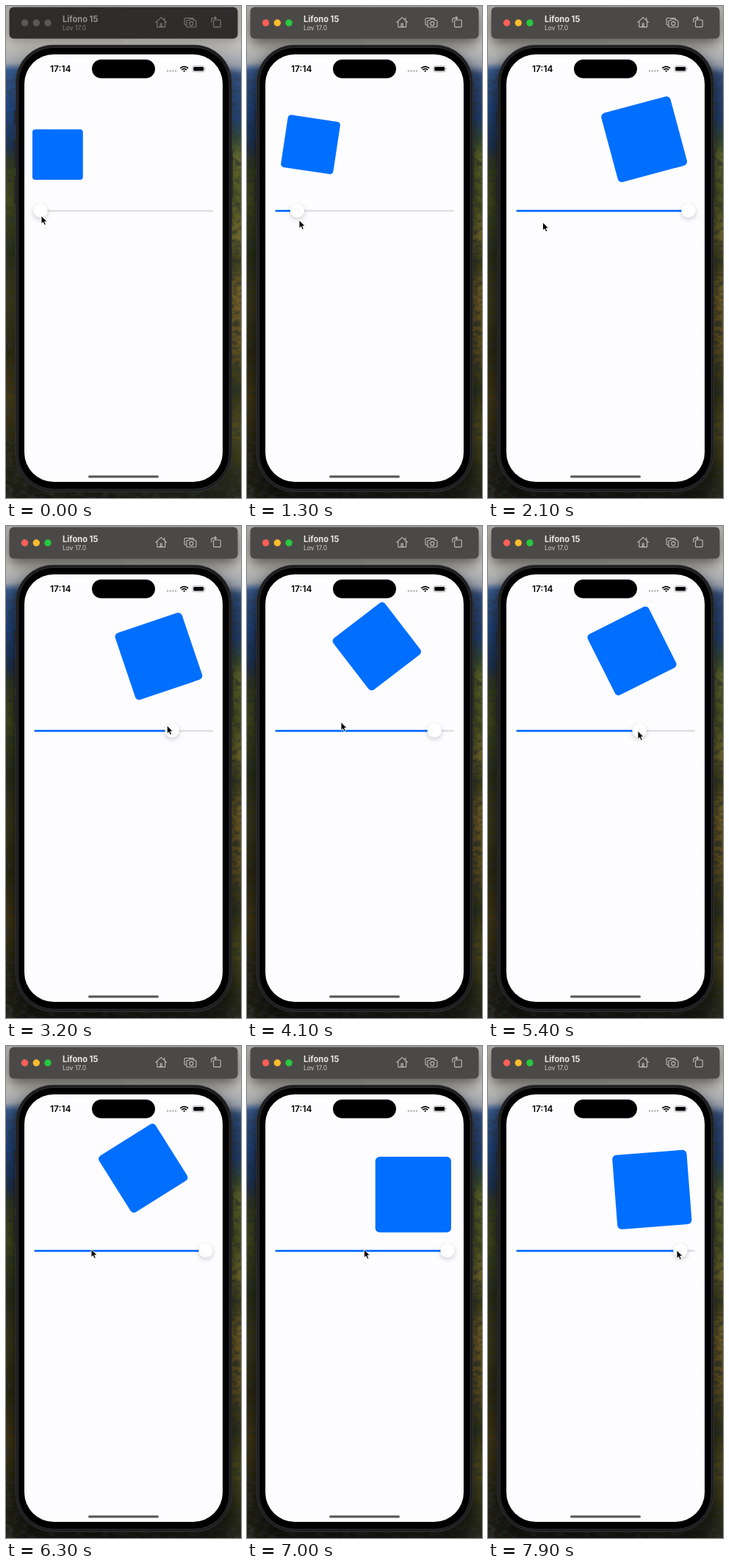
These frames come from a looping animation (320x671 px, 8000 ms). An HTML page:

```html
<!DOCTYPE html>
<html lang="en">
<head>
<meta charset="utf-8">
<title>Slider animation</title>
<style>
html, body { margin: 0; width: 100%; height: 100%; overflow: hidden; background: #222; }
svg { display: block; width: 320px; height: 671px; }
text { font-family: Inter, sans-serif; }
</style>
</head>
<body>
<svg viewBox="0 0 320 671">
  <defs>
    <linearGradient id="left" x1="0" y1="0" x2="0" y2="1">
      <stop offset="0" stop-color="#aaa8a4"/>
      <stop offset=".08" stop-color="#c6c3bb"/>
      <stop offset=".115" stop-color="#a3a7ad"/>
      <stop offset=".13" stop-color="#3a5e94"/>
      <stop offset=".21" stop-color="#234a88"/>
      <stop offset=".29" stop-color="#20375a"/>
      <stop offset=".32" stop-color="#3c4420"/>
      <stop offset=".4" stop-color="#464c20"/>
      <stop offset=".5" stop-color="#2c3216"/>
      <stop offset=".6" stop-color="#403d19"/>
      <stop offset=".7" stop-color="#2e2b11"/>
      <stop offset=".8" stop-color="#4a3c15"/>
      <stop offset=".9" stop-color="#2a2812"/>
      <stop offset="1" stop-color="#1f1f17"/>
    </linearGradient>
    <linearGradient id="right" x1="0" y1="0" x2="0" y2="1">
      <stop offset="0" stop-color="#b0aeaa"/>
      <stop offset=".08" stop-color="#c9c7c2"/>
      <stop offset=".12" stop-color="#9ba2ad"/>
      <stop offset=".14" stop-color="#37578c"/>
      <stop offset=".23" stop-color="#27477d"/>
      <stop offset=".27" stop-color="#39513c"/>
      <stop offset=".31" stop-color="#6d7430"/>
      <stop offset=".38" stop-color="#566026"/>
      <stop offset=".47" stop-color="#78702f"/>
      <stop offset=".52" stop-color="#3f4320"/>
      <stop offset=".58" stop-color="#806a2b"/>
      <stop offset=".7" stop-color="#6d5a22"/>
      <stop offset=".78" stop-color="#343718"/>
      <stop offset=".86" stop-color="#5f5720"/>
      <stop offset=".94" stop-color="#34361a"/>
      <stop offset="1" stop-color="#23241a"/>
    </linearGradient>
    <filter id="blur" x="-20%" y="-20%" width="140%" height="140%"><feGaussianBlur stdDeviation="9"/></filter>
    <filter id="soft" x="-60%" y="-60%" width="220%" height="220%"><feGaussianBlur stdDeviation="3"/></filter>
    <filter id="grain" x="0" y="0" width="1" height="1">
      <feTurbulence type="fractalNoise" baseFrequency=".1 .16" numOctaves="3" seed="4"/>
      <feColorMatrix values="0 0 0 0 .03  0 0 0 0 .04  0 0 0 0 .03  3 0 0 0 -1.2"/>
    </filter>
  </defs>

  <rect width="160" height="671" fill="url(#left)"/>
  <rect x="160" width="160" height="671" fill="url(#right)"/>
  <!-- foliage -->
  <rect y="195" width="320" height="476" filter="url(#grain)" opacity=".75"/>
  <rect y="88" width="320" height="107" filter="url(#grain)" opacity=".3"/>

  <g id="shade" filter="url(#blur)">
    <rect x="6" y="62" width="308" height="620" rx="50"/>
    <rect x="5" y="12" width="310" height="42" rx="8"/>
  </g>

  <!-- window bar -->
  <rect id="bar" x="4.5" y="1.5" width="311" height="43" rx="6"/>
  <g id="lights"><circle cx="25.5" cy="23" r="4.7"/><circle cx="41.3" cy="23" r="4.7"/><circle cx="57" cy="23" r="4.7"/></g>
  <g id="labels">
    <text x="77" y="21.6" font-size="11.1" font-weight="700">Lifono 15</text>
    <text x="77" y="32.6" font-size="8.6" fill-opacity=".85">Lov 17.0</text>
  </g>
  <g id="icons" fill="none" stroke-width="1.1" stroke-linejoin="round" stroke-linecap="round">
    <path d="M203.8 22.3l7.4-6.7 7.4 6.7M205.8 21v7.6h10.8V21M215.8 19.3v-3M210.2 28v-4h2v4z"/>
    <path d="M245.5 26h-1q-1.5 0-1.5-1.5v-6.5q0-1.5 1.5-1.5h9.5q1.5 0 1.5 1.5"/>
    <path d="M247.2 19.5h2l1-1.5h4.4l1 1.5h2q1.3 0 1.3 1.3v6.7q0 1.3-1.3 1.3h-10.400q-1.3 0-1.3-1.3v-6.7q0-1.3 1.3-1.3z"/>
    <circle cx="252.4" cy="24" r="2.6"/>
    <rect x="282.6" y="19" width="9.6" height="9.6" rx="1.3"/>
    <path d="M279.8 22v-3.2q0-2.4 2.4-2.4h4M284.5 14.3l2 2.1-2 2.1"/>
  </g>

  <!-- device -->
  <path d="M12.7 142v20M12.7 182v38M12.7 232v38M307.6 198v62" stroke="#1b1b1c" stroke-width="2"/>
  <rect x="13.3" y="53.3" width="294" height="609" rx="51" fill="#1c1c1e" stroke="#343437"/>
  <rect x="16.5" y="56.5" width="287.5" height="602.5" rx="48" fill="#000" stroke="#3b3b3e" stroke-width=".8"/>
  <rect x="25" y="66" width="270" height="583" rx="40" fill="#fdfcff"/>
  <rect x="117" y="73" width="86" height="25.5" rx="12.75"/>
  <text x="60" y="90.2" font-size="12" font-weight="600">17:14</text>
  <g fill="#b9b8bb"><circle cx="220" cy="88.6" r="1.3"/><circle cx="223.7" cy="88.6" r="1.3"/><circle cx="227.4" cy="88.6" r="1.3"/><circle cx="231" cy="88.6" r="1.3"/></g>
  <g fill="none" stroke="#000" stroke-width="1.7">
    <path d="M237.2 84.9q5.5-4.6 11 0M239.2 87q3.5-2.9 7 0"/>
    <path d="M241 88.3q1.7-1.3 3.4 0L242.7 90z" fill="#000" stroke="none"/>
  </g>
  <rect x="253.9" y="81.7" width="16.6" height="8.2" rx="2.6" fill="none" stroke="#a5a4a7" stroke-width=".8"/>
  <rect x="255.2" y="83" width="14" height="5.6" rx="1.5"/>
  <path d="M271.5 84.4q1.3 1.4 0 2.8z" fill="#a5a4a7"/>
  <rect x="112" y="640.3" width="96" height="3.2" rx="1.6" fill="#5b5b5d"/>

  <!-- content -->
  <rect id="box" x="-34.4" y="-34.4" width="68.8" height="68.8" rx="4" fill="#006fff"/>
  <rect x="38.5" y="278" width="243.5" height="2.7" rx="1.35" fill="#e1e0e3"/>
  <rect id="fill" x="38.5" y="278" height="2.7" rx="1.35" fill="#006fff"/>
  <g id="thumb">
    <circle cy="2.5" r="9.5" fill="#000" fill-opacity=".2" filter="url(#soft)"/>
    <circle r="9.7" fill="#fff"/>
  </g>
  <path id="cursor" d="M0 0V11.2L2.5 8.9 4.3 12.9 6.3 12 4.6 8.1H8.1Z" fill="#000" stroke="#fff" stroke-width=".9" stroke-linejoin="round"/>
</svg>
<script>
const $ = id => document.getElementById(id);
const LOOP = 8000, STEP = 100, ACTIVE_AT = 300;
const MOVE_MS = 1000, SLIDE_MS = 520;

// Each drag: [ms, slider value]; after its last point the thumb is let go.
const drags = [
  [[0, 0], [400, 0], [1300, .095], [1400, .11]],
  [[2850, 1], [3100, .88], [3500, .53], [3710, .39]],
  [[4950, 1], [5400, .704], [5810, .31]],
  [[7650, 1], [7900, .951], [8000, .91]]
];
// Pointer tip: [ms, x, y]
const pointer = [
  [0, 48, 286], [400, 49, 287], [1300, 71, 292], [1500, 74.5, 294.5], [2200, 74.5, 295],
  [2800, 268, 276], [3100, 239, 273], [3500, 160, 269], [3710, 128, 267.5], [4200, 128, 267.5],
  [4850, 271, 280], [4950, 271, 280], [5400, 204, 279.5], [5810, 116, 277], [6800, 116, 277],
  [7500, 268, 279], [7650, 268, 279], [7900, 257, 278.5], [8000, 248, 278.5]
];

function track(keys, t) {
  let i = 0;
  while (i < keys.length - 2 && t > keys[i + 1][0]) i++;
  const a = keys[i], b = keys[i + 1];
  const u = Math.min(1, Math.max(0, (t - a[0]) / (b[0] - a[0])));
  return a.slice(1).map((v, n) => v + (b[n + 1] - v) * u);
}

// cubic-bezier(.42, 0, .58, 1)
function easeInOut(x) {
  if (x >= 1) return 1;
  let lo = 0, hi = 1;
  for (let i = 0; i < 22; i++) {
    const s = (lo + hi) / 2;
    const bx = 3 * s * (1 - s) * (.42 * (1 - s) + .58 * s) + s ** 3;
    if (bx < x) lo = s; else hi = s;
  }
  return lo * lo * (3 - 2 * lo);
}

function state(t) {
  const drag = drags.filter(d => d[0][0] <= t).pop();
  const [end, last] = drag[drag.length - 1];
  if (t <= end) {
    const [v] = track(drag, t);
    return { slide: v, move: v };
  }
  const toEnd = ms => last + (1 - last) * easeInOut((t - end) / ms);
  return { slide: toEnd(SLIDE_MS), move: toEnd(MOVE_MS) };
}

function placeBox(p) {
  const angle = p * Math.PI / 2, scale = 1 + p / 2, arm = 104;
  const x = 70.35 + arm * scale * Math.sin(angle);
  const y = 202.6 + arm * (1 - p - scale * Math.cos(angle));
  $('box').setAttribute('transform', `translate(${x} ${y}) rotate(${p * 90}) scale(${scale})`);
}

function setActive(on) {
  $('bar').setAttribute('fill', on ? '#4b4947' : '#2e2d2b');
  $('labels').setAttribute('fill', on ? '#e9e8e7' : '#92908e');
  $('icons').setAttribute('stroke', on ? '#bfbdbb' : '#7d7b79');
  $('shade').setAttribute('opacity', on ? .5 : .22);
  const colors = on ? ['#ff5f57', '#febc2e', '#28c840'] : Array(3).fill('#5b5957');
  [...$('lights').children].forEach((c, i) => c.setAttribute('fill', colors[i]));
}

function draw(time) {
  const t = Math.floor((time % LOOP) / STEP) * STEP;
  const { slide, move } = state(t);
  const thumbX = 47 + 226 * slide;
  const [px, py] = track(pointer, t);
  setActive(t >= ACTIVE_AT);
  placeBox(move);
  $('fill').setAttribute('width', thumbX - 38.5);
  $('thumb').setAttribute('transform', `translate(${thumbX} 279)`);
  $('cursor').setAttribute('transform', `translate(${px} ${py})`);
}

const start = performance.now();
function frame() {
  draw(performance.now() - start);
  requestAnimationFrame(frame);
}
frame();
</script>
</body>
</html>
```
